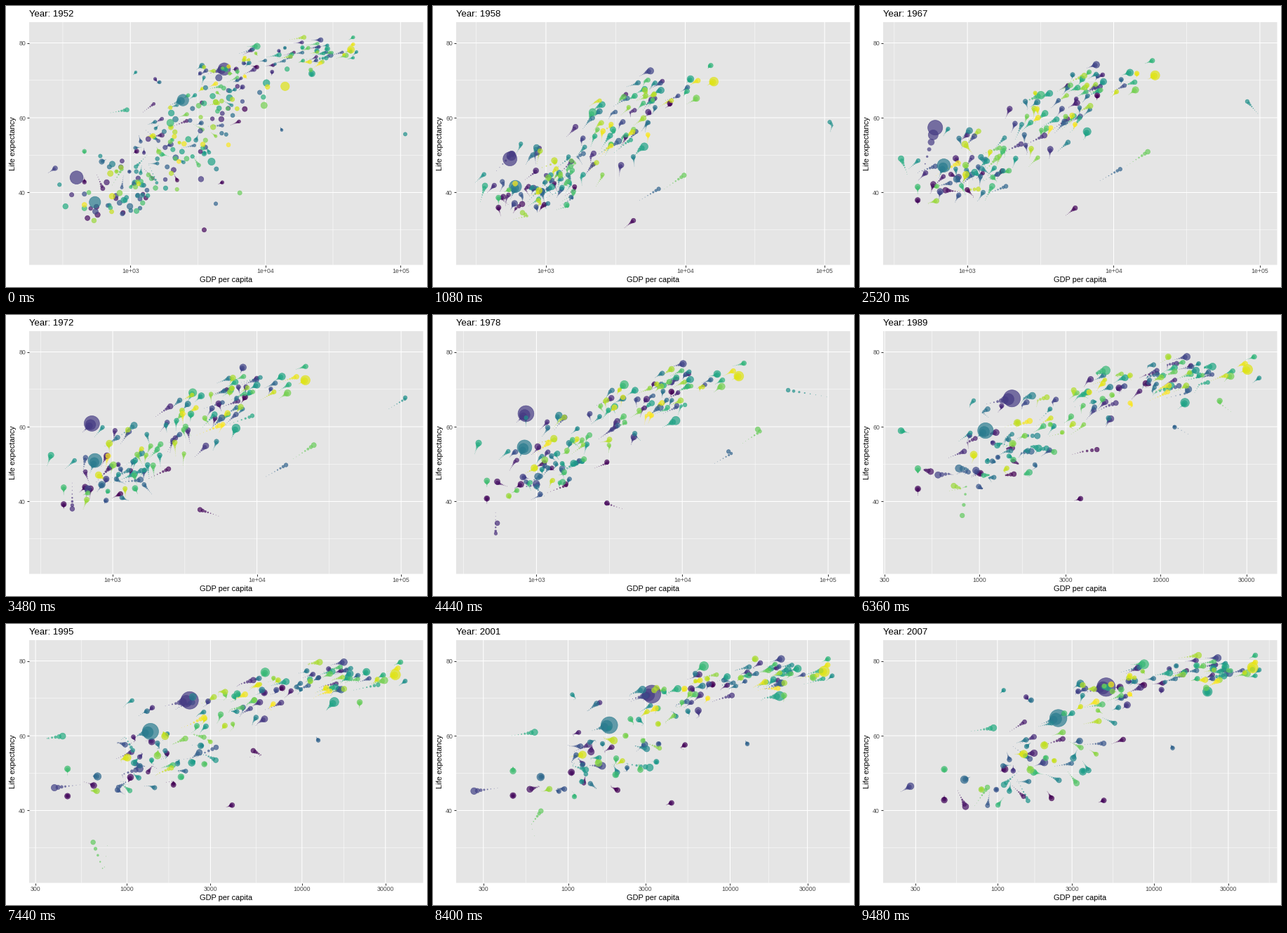
Recreate the animation shown at these times as a matplotlib script. Size 600 by 400 pixels, loop 9.6 s.

```python
import numpy as np
import matplotlib
import matplotlib.pyplot as plt
from matplotlib.animation import FuncAnimation

W, H, DPI = 600, 400, 100
FRAMES, STEP, WAKE = 80, 120, 8
RANKS = 142
PX = 72 / DPI  # points per pixel

plt.rcParams["font.family"] = "Liberation Sans"
plt.rcParams["path.snap"] = False

YEARS = np.linspace(1952, 2007, FRAMES)
T = np.linspace(0, 1, FRAMES)
KNOTS = np.linspace(0, 1, 12)
rng = np.random.default_rng(12)
tracks = {}


def add(rank, pop, x, y):
    """Store a path; population in millions grows steadily."""
    people = pop[0] + (pop[1] - pop[0]) * T
    size = 2 + 10 * np.sqrt(np.clip(people - .06, 0, None) / 1318.6)
    tracks[rank] = x, y, size


def key_track(rank, pop, *keys):
    """Path through a few (year, income, life expectancy) points."""
    year, income, life = np.array(keys).T
    add(rank, pop, np.interp(YEARS, year, np.log10(income)),
        np.interp(YEARS, year, life))


# The paths that stand alone or set the width of the view
key_track(24, (556, 1318.6), (1952, 400, 44), (1957, 576, 50.5),
          (1962, 488, 44.5), (1967, 613, 58.4), (1982, 962, 65.5),
          (2007, 4959, 73))
key_track(58, (372, 1110), (1952, 547, 37.4), (1977, 813, 54.2),
          (1992, 1164, 60.2), (2007, 2452, 64.7))
key_track(134, (157, 301), (1952, 13990, 68.4), (1977, 24073, 73.4),
          (2007, 42952, 78.2))
key_track(71, (.2, 2.5), (1952, 108382, 55.6), (1957, 113523, 58),
          (1967, 80895, 64.6), (1972, 109348, 67.7), (1982, 31354, 71.3),
          (2007, 47307, 77.6))
key_track(27, (14, 64), (1952, 781, 39.1), (1972, 905, 46),
          (1987, 673, 47.4), (2002, 241, 45), (2007, 278, 46.5))
key_track(87, (20, 48), (1952, 331, 36.3), (1962, 388, 45.1),
          (1967, 349, 49.4), (1982, 424, 58.1), (1992, 347, 59.3),
          (2007, 944, 62.1))
key_track(107, (2.5, 8.9), (1952, 493, 40), (1987, 848, 44),
          (1992, 737, 23.6), (1997, 590, 36.1), (2007, 863, 46.2))
key_track(18, (4.7, 14), (1952, 368, 39.4), (1967, 523, 45.4),
          (1977, 525, 31.2), (1982, 624, 51), (2007, 1714, 59.7))
key_track(109, (4, 27.6), (1952, 6460, 39.9), (1977, 34168, 58.7),
          (1987, 21198, 66.3), (2007, 21655, 72.8))
key_track(3, (4.2, 12.4), (1952, 3521, 30), (1967, 5523, 36),
          (1977, 3009, 39.5), (2007, 4797, 42.7))
key_track(45, (.4, 1.5), (1952, 4293, 37), (1977, 21746, 52.8),
          (1987, 11864, 60.2), (2007, 13206, 56.7))
key_track(73, (.7, 2), (1952, 299, 42.1), (1992, 977, 59.7),
          (2007, 1569, 42.6))


def lerp(ends):
    return ends[0] + (ends[1] - ends[0]) * KNOTS


def crowd(ranks, income, income_sd, life, life_sd, ease, growth, wobble,
          crisis=0):
    """Scatter countries around a region's mean, each with its own drift."""
    for rank in ranks:
        start, drift, health = np.clip(rng.normal(size=3), -1.8, 1.8)
        rich = lerp((start, .75 * start + .6 * drift))
        x = lerp(income) + lerp(income_sd) * rich
        x += rng.normal(0, .012 + .03 * wobble, KNOTS.size)
        rise = 1 - (1 - KNOTS) ** ease
        y = life[0] + (life[1] - life[0]) * rise
        y += lerp(life_sd) * (.65 * rich + .7 * health)
        y += rng.normal(0, .6 * wobble, KNOTS.size)
        if rng.random() < crisis:
            y -= 9 * np.clip(3 * KNOTS - 2, 0, 1)
        x = np.clip(x, 2.66, 4.25 + .4 * KNOTS)
        y = np.clip(y, 30, 73 + 8.5 * KNOTS)
        pop = min(10 ** rng.normal(.7, .5), 80)
        add(rank, (pop, pop * growth),
            np.interp(T, KNOTS, x), np.interp(T, KNOTS, y))


free = rng.permutation([r for r in range(RANKS) if r not in tracks])
south, west, north, east = np.split(free, [46, 70, 101])
crowd(south, (2.98, 3.2), (.22, .36), (39.5, 57), (4.5, 7), 1.6, 3, 1, .35)
crowd(west, (3.48, 3.86), (.22, .24), (53, 73.5), (8, 4), 1.4, 2.5, .4)
crowd(north, (3.72, 4.38), (.22, .22), (65.5, 78), (5, 2.4), 1.3, 1.3, .3)
crowd(east, (3.1, 3.75), (.33, .5), (46, 71), (8, 6), 1.4, 2.6, .6)

order = sorted(tracks)
X, Y, SIZE = (np.array([tracks[r][j] for r in order]).T for j in range(3))
RGBA = matplotlib.colormaps["viridis"](np.array(order) / (RANKS - 1))
RGBA[:, 3] = .7

# Oldest wake first, the current state on top
AGES = np.arange(WAKE - 1, -1, -1)
FADE = np.repeat((1 - AGES / WAKE) ** 3, RANKS)

fig = plt.figure(figsize=(W / DPI, H / DPI), dpi=DPI, facecolor="white")
ax = fig.add_axes([33 / W, 1 - 368.5 / H, 561.5 / W, 345.5 / H],
                  facecolor="#E5E5E5")
for side in ax.spines.values():
    side.set_visible(False)
ax.set_axisbelow(True)
ax.grid(which="major", color="white", lw=1.07 * PX)
ax.grid(which="minor", color="white", lw=.53 * PX)
ax.tick_params(which="major", length=2.75 * PX, width=1.07 * PX,
               pad=2.2 * PX, color="#333333", labelcolor="#4D4D4D",
               labelsize=8.8 * PX)
ax.tick_params(which="minor", length=0)
ax.set_ylim(20.65, 85.55)
ax.set_yticks([40, 60, 80])
ax.set_yticks([30, 50, 70], minor=True)

title = fig.text(33 / W, 1 - 15 / H, "", fontsize=13.2 * PX)
fig.text(313.7 / W, 1 - 393 / H, "GDP per capita", fontsize=11 * PX,
         ha="center")
fig.text(13.5 / W, 1 - 196 / H, "Life expectancy", fontsize=11 * PX,
         rotation=90, rotation_mode="anchor", ha="center", va="baseline")
dots = ax.scatter([], [])
dots.set_facecolor(np.tile(RGBA, (WAKE, 1)))
dots.set_edgecolor(np.tile(RGBA, (WAKE, 1)))
dots.set_linewidths(.71 * PX * FADE)


def set_view(x):
    """Follow the data sideways and choose round breaks on the log axis."""
    pad = .05 * (x.max() - x.min())
    lo, hi = x.min() - pad, x.max() + pad
    if hi >= 5:
        breaks, names = [3, 4, 5], ["1e+03", "1e+04", "1e+05"]
    else:
        shown = [v for v in (300, 1000, 3000, 10000, 30000)
                 if lo <= np.log10(v) <= hi]
        breaks, names = np.log10(shown), [str(v) for v in shown]
    step = breaks[1] - breaks[0]
    wide = np.array([breaks[0] - step, *breaks, breaks[-1] + step])
    mids = (wide[1:] + wide[:-1]) / 2
    ax.set_xticks(breaks, names)
    ax.set_xticks(mids[(mids > lo) & (mids < hi)], minor=True)
    ax.set_xlim(lo, hi)


def draw(i):
    rows = (i - AGES) % FRAMES
    x, y = X[rows], Y[rows]
    radius = .375 * (2.845 * SIZE[rows].ravel() * FADE + .945)
    dots.set_offsets(np.column_stack([x.ravel(), y.ravel()]))
    dots.set_sizes((2 * radius * PX) ** 2)
    set_view(X[(i - np.arange(WAKE + 1)) % FRAMES])
    title.set_text(f"Year: {round(YEARS[i])}")
    return dots, title


anim = FuncAnimation(fig, draw, frames=FRAMES, interval=STEP, repeat=True)
plt.show()
```
